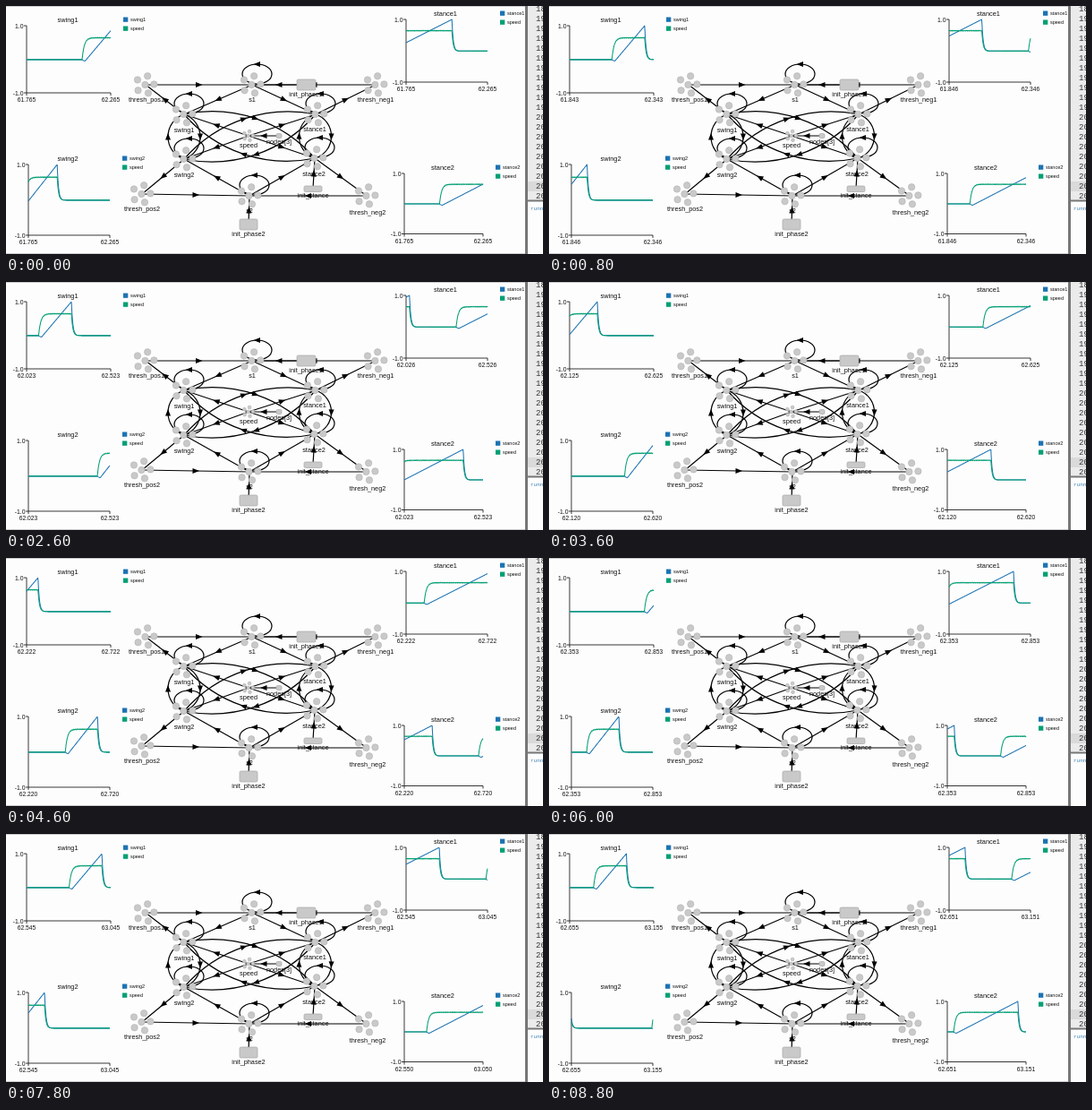
An HTML page with a canvas for the animation above (8900 ms loop, 600x277 px).

```html
<!DOCTYPE html>
<html lang="en">
<head>
<meta charset="utf-8">
<title>Gait oscillator network</title>
<style>
html, body { margin: 0; width: 100%; height: 100%; overflow: hidden; background: #fdfdfd; }
canvas { display: block; width: 600px; height: 277px; }
</style>
</head>
<body>
<canvas id="stage" width="600" height="277"></canvas>
<script>
const W = 600, H = 277, LOOP = 8900, STEP = 100;
const SANS = '"Liberation Sans", sans-serif';
const MONO = '"Liberation Mono", monospace';
const BLUE = '#1c73b3', GREEN = '#039f74';
const PERIOD = 0.7025, SPAN = 0.5, LEVEL = 0.64, REST = -0.01;
const canvas = document.getElementById('stage');
const main = canvas.getContext('2d');

// Simulation clock at a few playback times, read off linearly in between.
const KEYS = [0, 1600, 3600, 4600, 6000, 7800, 8800];

const plots = [
  { name: 'swing1', x0: 23, x1: 117, y0: 22, y1: 97, title: [69, 17.5], legend: [131, 12.5],
    start: 62.095, dur: 0.195, clock: [61.765, 61.922, 62.125, 62.222, 62.353, 62.545, 62.655] },
  { name: 'swing2', x0: 25, x1: 116, y0: 177, y1: 256, title: [69, 172.5], legend: [130, 167.5],
    start: 62.4465, dur: 0.198, clock: [61.765, 61.926, 62.120, 62.220, 62.353, 62.545, 62.655] },
  { name: 'stance1', x0: 447, x1: 538, y0: 15, y1: 85, title: [491, 10.5], legend: [552, 5.5],
    start: 62.333, dur: 0.416, clock: [61.765, 61.926, 62.125, 62.222, 62.353, 62.545, 62.651] },
  { name: 'stance2', x0: 445, x1: 533, y0: 187, y1: 254.5, title: [488, 182.5], legend: [547, 177.5],
    start: 61.989, dur: 0.408, clock: [61.765, 61.926, 62.120, 62.220, 62.353, 62.550, 62.651] }
];

const nodes = {
  pos1: [156, 88, 'thresh_pos1', 157, 106.5],
  s1: [275, 88, 's1', 275, 107],
  neg1: [413, 88, 'thresh_neg1', 413, 107],
  swing1: [199, 121, 'swing1', 199, 141],
  stance1: [346, 121, 'stance1', 345, 140],
  swing2: [199, 171, 'swing2', 199, 191],
  stance2: [345, 170, 'stance2', 344, 190],
  pos2: [152, 210, 'thresh_pos2', 152, 229],
  s2: [272, 212, 's2', 272, 231],
  neg2: [403, 212, 'thresh_neg2', 404, 233]
};
const speed = [271, 145];
const blobs = [[-11.2, -7.5], [0.2, -0.1], [5, 12.6], [13.7, -0.8], [-10.4, 8.4], [3.9, -13.2]];

function write(c, text, x, y, size, align = 'center', color = '#111', family = SANS) {
  c.font = size + 'px ' + family;
  c.textAlign = align;
  c.fillStyle = color;
  c.fillText(text, x, y);
}

function stroke(c, color, width, points) {
  c.beginPath();
  points.forEach(([x, y]) => c.lineTo(x, y));
  c.strokeStyle = color;
  c.lineWidth = width;
  c.stroke();
}

function arrow(c, x, y, angle) {
  c.save();
  c.translate(x, y);
  c.rotate(angle);
  c.beginPath();
  c.moveTo(4, 0);
  c.lineTo(-3.5, -3);
  c.lineTo(-3.5, 3);
  c.fillStyle = '#000';
  c.fill();
  c.restore();
}

// Connection with its arrow at the middle; bow is the height of a round arc to the left of travel.
function link(c, [ax, ay], [bx, by], bow = 0) {
  const len = Math.hypot(bx - ax, by - ay);
  const angle = Math.atan2(by - ay, bx - ax);
  const lift = -bow * 4 / 3;
  const inset = bow ? bow * 4 / 3 / Math.tan(2 * Math.atan(2 * bow / len)) : len / 3;
  c.save();
  c.translate(ax, ay);
  c.rotate(angle);
  c.beginPath();
  c.moveTo(0, 0);
  c.bezierCurveTo(inset, lift, len - inset, lift, len, 0);
  c.strokeStyle = '#000';
  c.lineWidth = 1.2;
  c.stroke();
  arrow(c, len / 2, -bow, 0);
  c.restore();
}

function selfLoop(c, [x, y]) {
  c.beginPath();
  c.ellipse(x + 5.5, y - 12, 16.5, 11, 0, 0, 2 * Math.PI);
  c.strokeStyle = '#000';
  c.lineWidth = 1.2;
  c.stroke();
  arrow(c, x + 5.5, y - 23, Math.PI);
}

function ensemble(c, [x, y], scale) {
  c.fillStyle = '#c9c9c9';
  c.strokeStyle = '#b4b4b4';
  c.lineWidth = 0.6;
  for (const [dx, dy] of blobs) {
    c.beginPath();
    c.arc(x + (dx - 1) * scale, y + dy * scale, 5 * scale, 0, 2 * Math.PI);
    c.fill();
    c.stroke();
  }
}

function box(c, x, y, w, h) {
  c.beginPath();
  c.roundRect(x, y, w, h, 1.5);
  c.fillStyle = '#c9c9c9';
  c.fill();
  c.strokeStyle = '#a8a8a8';
  c.lineWidth = 0.7;
  c.stroke();
}

function network(c) {
  const n = nodes;
  const straight = [
    [n.pos1, n.s1], [n.neg1, n.s1], [[335, 88], n.s1],
    [n.stance1, n.neg1], [n.swing1, n.pos1], [n.s1, n.swing1], [n.s1, n.stance1],
    [n.swing2, n.pos2], [n.stance2, n.neg2], [n.s2, n.swing2], [n.s2, n.stance2],
    [n.pos2, n.s2], [n.neg2, n.s2], [[271, 244], n.s2], [[343, 204], n.stance2],
    [[305, 145], speed],
    [speed, n.swing1], [speed, n.swing2], [speed, n.stance1], [speed, n.stance2]
  ];
  straight.forEach(([a, b]) => link(c, a, b));
  const mutual = [
    [n.swing1, n.stance2, 21], [n.stance1, n.swing2, 21],
    [n.swing1, n.swing2, 18], [n.stance1, n.stance2, 18]
  ];
  for (const [a, b, bow] of mutual) {
    link(c, a, b, bow);
    link(c, b, a, bow);
  }
  [n.s1, n.swing1, n.stance1, n.swing2, n.stance2, n.s2].forEach(p => selfLoop(c, p));

  Object.values(n).forEach(p => ensemble(c, p, 0.74));
  ensemble(c, speed, 0.38);
  box(c, 325, 82, 21, 12);
  box(c, 261, 238, 20, 12);
  box(c, 333, 201, 20, 6.5);
  box(c, 302, 142.5, 6, 5);

  Object.values(n).forEach(([, , text, x, y]) => write(c, text, x, y, 7.3));
  write(c, 'init_phase1', 335, 100.5, 7.3);
  write(c, 'init_phase2', 271, 256.5, 7.3);
  write(c, 'init_stance', 343, 214, 7.3);
  write(c, 'speed', 271, 157.5, 7.3);
  write(c, 'nodes[3]', 305, 154, 7.3);
}

function sidebar(c) {
  c.fillStyle = '#ebebeb';
  c.fillRect(583, 0, 17, 217);
  c.fillStyle = '#dadada';
  c.fillRect(583, 196, 17, 11);
  for (let k = 0; k < 20; k++) {
    write(c, String(189 + k), 592, 6 + 11 * k, 9, 'left', '#333', MONO);
  }
  c.fillStyle = '#777';
  c.fillRect(583, 216.5, 17, 2);
  write(c, 'running', 586, 228, 6, 'left', '#3a7fb5', MONO);
  c.fillStyle = '#777';
  c.fillRect(580, 0, 3, H);
  c.fillStyle = '#d0d0d0';
  c.fillRect(0, 0, 580, 1);
  c.fillRect(0, 276, 580, 1);
}

function plotFrame(c, p) {
  stroke(c, '#222', 0.9, [
    [p.x0 - 3, p.y0], [p.x0, p.y0], [p.x0, p.y1], [p.x0 - 3, p.y1]
  ]);
  stroke(c, '#222', 0.9, [
    [p.x0, p.y1 + 3], [p.x0, p.y1], [p.x1, p.y1], [p.x1, p.y1 + 3]
  ]);
  write(c, '1.0', p.x0 - 3.5, p.y0 + 2.5, 6.8, 'right');
  write(c, '-1.0', p.x0 - 3.5, p.y1 + 2.5, 6.8, 'right');
  write(c, p.name, ...p.title, 7.4);
  const [x, y] = p.legend;
  [[BLUE, p.name], [GREEN, 'speed']].forEach(([color, text], i) => {
    c.fillStyle = color;
    c.fillRect(x, y + 10 * i, 5.3, 5.3);
    write(c, text, x + 8, y + 10 * i + 4.6, 5.5, 'left');
  });
}

function clockAt(p, ms) {
  let i = 1;
  while (i < KEYS.length - 1 && ms > KEYS[i]) i++;
  const f = (ms - KEYS[i - 1]) / (KEYS[i] - KEYS[i - 1]);
  return p.clock[i - 1] + f * (p.clock[i] - p.clock[i - 1]);
}

const sincePulse = (p, t) => ((t - p.start) % PERIOD + PERIOD) % PERIOD;
const decay = (from, u) => REST + (from - REST) * Math.exp(-u / 0.008);

function ramp(p, t) {
  const u = sincePulse(p, t), lag = 0.018;
  if (u > p.dur) return decay(1, u - p.dur);
  if (u < lag) return REST - 0.04 * Math.sin(u / lag * Math.PI / 2);
  return -0.05 + 1.05 * (u - lag) / (p.dur - lag);
}

function drive(p, t) {
  const u = sincePulse(p, t);
  if (u > p.dur) return decay(LEVEL, u - p.dur);
  const rise = 1 - Math.exp(-u / 0.013);
  return REST + rise * (LEVEL - REST + 0.014 * Math.sin(t * 900) * Math.sin(t * 337 + 1));
}

function curve(c, p, t0, color, signal) {
  const points = [], count = 240;
  for (let i = 0; i <= count; i++) {
    const f = i / count, v = signal(p, t0 + f * SPAN);
    points.push([p.x0 + f * (p.x1 - p.x0), p.y0 + (1 - v) / 2 * (p.y1 - p.y0)]);
  }
  c.lineJoin = 'round';
  stroke(c, color, 1.05, points);
}

const backdrop = document.createElement('canvas');
backdrop.width = W;
backdrop.height = H;
const back = backdrop.getContext('2d');
back.fillStyle = '#fdfdfd';
back.fillRect(0, 0, W, H);
network(back);
sidebar(back);
plots.forEach(p => plotFrame(back, p));

function draw(ms) {
  main.drawImage(backdrop, 0, 0);
  for (const p of plots) {
    const t0 = clockAt(p, ms);
    curve(main, p, t0, BLUE, ramp);
    curve(main, p, t0, GREEN, drive);
    write(main, t0.toFixed(3), p.x0, p.y1 + 10, 6.7);
    write(main, (t0 + SPAN).toFixed(3), p.x1, p.y1 + 10, 6.7);
  }
}

const begin = performance.now();
function tick() {
  const ms = (performance.now() - begin) % LOOP;
  draw(Math.floor(ms / STEP) * STEP);
  requestAnimationFrame(tick);
}
tick();
</script>
</body>
</html>
```
